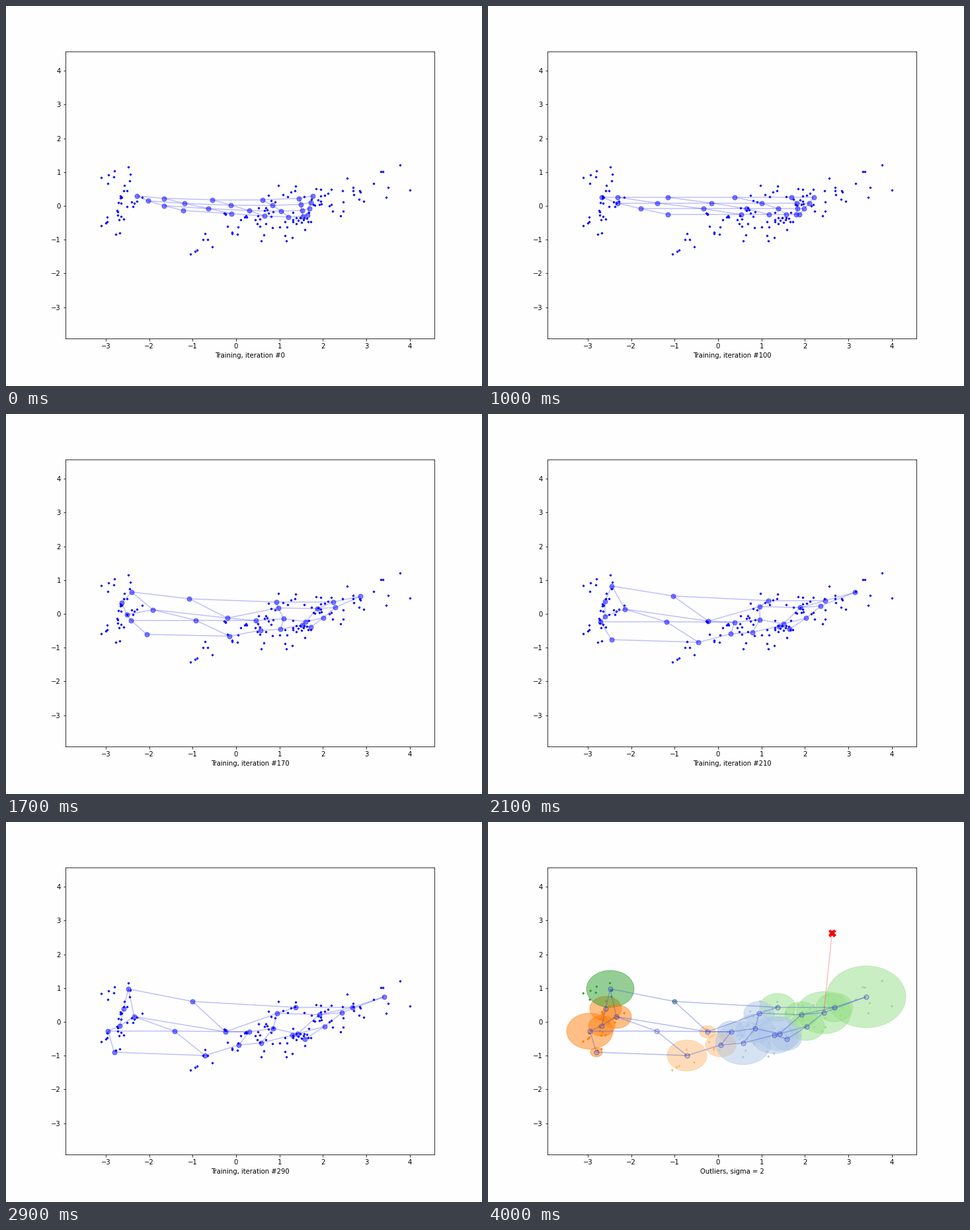
Write a matplotlib script that moves like this. It is 720 by 576 pixels and loops after 7.1 s.

```python
import numpy as np
import matplotlib.pyplot as plt
from matplotlib.animation import FuncAnimation
from matplotlib.collections import LineCollection
from matplotlib.patches import Circle

plt.rcParams.update({"font.family": "DejaVu Sans", "font.size": 10})

ROWS, COLS = 4, 6
TRAIN_FRAMES, LINK_STEPS, TOTAL_FRAMES = 30, 10, 71
ITERATIONS_PER_FRAME = 10
UNFOLD_START, UNFOLD_END = 100, 290
LIMITS = (-3.925, 4.565)
WIDTH, HEIGHT = 720, 576
ORIGIN = np.array([347.96, 302.96])
SCALE = np.array([65.72, -51.22])  # pixels per data unit
OUTLIER, WINNER = np.array([520.3, 168.4]), 11
PAPER = "#fefefe"

# Trained map: x, y and reach of each node in pixels, row by row.
TRAINED = np.array([
    (178, 283, 24), (185, 253, 36), (282, 272, 3),
    (438, 281, 27), (524, 281, 28), (572, 265, 60),
    (172, 309, 20), (194, 295, 23), (332, 318, 12),
    (410, 290, 23), (474, 292, 25), (508, 289, 41),
    (154, 317, 35), (255, 317, 0), (368, 318, 21),
    (404, 313, 28), (441, 321, 33), (482, 310, 27),
    (164, 349, 9), (301, 354, 30), (352, 338, 23),
    (386, 335, 42), (433, 323, 36), (452, 329, 22)])
FINAL, REACH = TRAINED[:, :2], TRAINED[:, 2]
PALETTE = {"O": "#ff7f0e", "o": "#ffbb78", "G": "#2ca02c",
           "g": "#98df8a", "b": "#aec7e8"}
COLORS = [PALETTE[c] for c in "OGGggg" "OOobgg" "OObbbg" "Ooobbb"]

# Shape of the still folded sheet at iterations 0, 40 and 100.
SHEET_TIMES = (0, 40, 100)
SHEET = dict(left=(198, 190, 172), spread=(70, 84, 100),
             right=(464, 484, 493), taper=(8, 32, 22),
             bend_top=(1.6, 1.0, 2.2), bend_bottom=(0.8, 0.85, 0.5),
             top=(288, 304, 290), drop=(22, 16, 26),
             fade=(-0.3, 0.6, 0), bow=(6, 1, 0))

index = np.arange(ROWS * COLS).reshape(ROWS, COLS)
edges = ([(a, b) for row in index for a, b in zip(row, row[1:])]
         + [(a, b) for col in index.T for a, b in zip(col, col[1:])])
v, u = (g.ravel() for g in np.meshgrid(np.linspace(0, 1, ROWS),
                                       np.linspace(0, 1, COLS), indexing="ij"))


def to_data(points):
    return (points - ORIGIN) / SCALE


def folded_sheet(iteration):
    p = {name: np.interp(iteration, SHEET_TIMES, values)
         for name, values in SHEET.items()}
    left = p["left"] + p["spread"] * v ** 1.3
    right = p["right"] - p["taper"] * v
    bend = p["bend_top"] * (p["bend_bottom"] / p["bend_top"]) ** v
    x = left + (right - left) * np.sin(np.pi / 2 * u) ** bend
    y = (p["top"] + p["drop"] * v * (1 - p["fade"] * u)
         + p["bow"] * np.sin(np.pi * u))
    return np.column_stack([x, y])


def pose_at(iteration):
    progress = (iteration - UNFOLD_START) / (UNFOLD_END - UNFOLD_START)
    weight = np.sin(np.pi / 2 * np.clip(progress, 0, 1))
    sheet = folded_sheet(iteration)
    return to_data(sheet + weight * (FINAL - sheet))


# Samples gather around each node within its reach.
rng = np.random.default_rng(7)
counts = np.where(REACH > 5, np.minimum(REACH // 4, 8), 0)
owners = np.repeat(np.arange(ROWS * COLS), counts)
offsets = rng.normal(0, 0.45, (len(owners), 2)) * REACH[owners, None]
samples = to_data(FINAL[owners] + offsets * [1, SCALE[1] / SCALE[0]])
sample_colors = [COLORS[k] for k in owners]

fig = plt.figure(figsize=(WIDTH / 72, HEIGHT / 72), dpi=72, facecolor=PAPER)
ax = fig.add_axes([0.125, 0.125, 0.775, 0.755], facecolor=PAPER)
ax.set(xlim=LIMITS, ylim=LIMITS, xticks=range(-3, 5), yticks=range(-3, 5))
caption = fig.text(369 / WIDTH, 43 / HEIGHT, "", ha="center", va="baseline")

final_nodes = to_data(FINAL)
dots = ax.scatter(*samples.T, s=4, marker="D", linewidths=1, zorder=1)
mesh = LineCollection([], linewidths=1.5, zorder=3)
ax.add_collection(mesh)
nodes = ax.scatter(*final_nodes.T, s=49, linewidths=1, zorder=4)
regions = [ax.add_patch(Circle(center, reach / SCALE[0], color=color,
                               alpha=0.5, lw=1, zorder=2))
           for center, reach, color in zip(final_nodes, REACH, COLORS) if reach]
cross = to_data(OUTLIER)
link, = ax.plot([], [], color="red", alpha=0.25, lw=1.5, zorder=5)
mark, = ax.plot(*cross, "X", color="red", ms=11, mew=0.5, zorder=6)


def draw(frame):
    training = frame < TRAIN_FRAMES
    iteration = frame * ITERATIONS_PER_FRAME
    position = pose_at(iteration)
    nodes.set_offsets(position)
    mesh.set_segments([position[[a, b]] for a, b in edges])
    for artist in (*regions, link, mark):
        artist.set_visible(not training)

    if training:
        caption.set_text(f"Training, iteration #{iteration}")
        dots.set_color("blue")
        mesh.set_color((0, 0, 1, 0.25))
        nodes.set_color((0, 0, 1, 0.5))
    else:
        caption.set_text("Outliers, sigma = 2")
        dots.set_color(sample_colors)
        mesh.set_color((0.25, 0.35, 0.88, 0.4))
        nodes.set_facecolor((0, 0, 1, 0.15))
        nodes.set_edgecolor((0.2, 0.2, 0.6, 0.55))
        grown = min((frame - TRAIN_FRAMES) / LINK_STEPS, 1)
        tip = cross + grown * (final_nodes[WINNER] - cross)
        link.set_data(*zip(cross, tip))
    return []


animation = FuncAnimation(fig, draw, frames=TOTAL_FRAMES, interval=100,
                          init_func=lambda: draw(0), repeat=True, repeat_delay=0)
plt.show()
```
